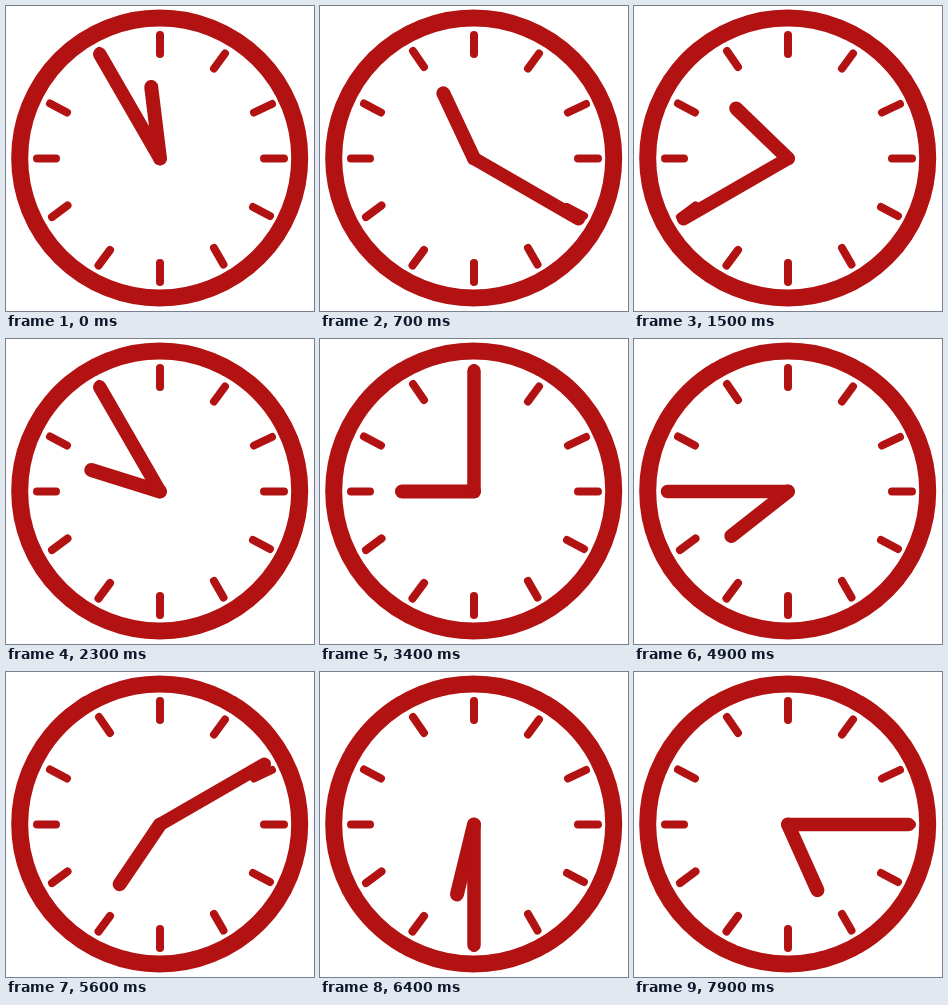
Write an HTML page that moves like this. It is 308 by 305 pixels and loops after 8000 ms.

```html
<!DOCTYPE html>
<html lang="en">
<head>
<meta charset="utf-8">
<title>Clock running backwards</title>
<style>
  html, body { margin: 0; width: 100%; height: 100%; overflow: hidden; background: #fff; }
  svg { display: block; width: 100vw; height: 100vh; }
  svg * { fill: none; stroke: #b21212; stroke-linecap: round; }
</style>
</head>
<body>
<svg viewBox="0 0 308 305">
  <circle cx="153.7" cy="152" r="140" stroke-width="17"/>
  <path stroke-width="8" d="M154 29V48M219 47.500L208 62.500M266 98L248 106.500M258 152.500H278M247 201L264 210M208 242L217.500 258.500M154 257V276M104 244L92.500 259.500M61.500 199.500L46 211M31 152.500H50M44 97.500L61 106.500M93 45L104 61"/>
  <path id="hour" stroke-width="14" d="M154 152.500V80.500"/>
  <path id="minute" stroke-width="13.5" d="M154 152.500V32"/>
</svg>
<script>
const LOOP = 8000, STEP = 100;
// Hour hand: [step, degrees clockwise from twelve]
const HOUR_KEYS = [[0, 353], [15, 314], [23, 287.4], [34, 270], [49, 231.9], [64, 193.7], [79, 155.9]];
const hour = document.getElementById('hour');
const minute = document.getElementById('minute');

function hourAngle(step) {
  const i = Math.max(1, HOUR_KEYS.findIndex(([s]) => s >= step));
  const [s0, a0] = HOUR_KEYS[i - 1], [s1, a1] = HOUR_KEYS[i];
  return a0 + (a1 - a0) * (step - s0) / (s1 - s0);
}

// The minute hand jumps back five minutes per step and skips one mark after step 19.
function minuteAngle(step) {
  return 330 - 30 * (step + (step > 19 ? 1 : 0));
}

function turn(hand, angle) {
  hand.setAttribute('transform', `rotate(${angle} 154 152.5)`);
}

function draw() {
  const step = Math.floor(performance.now() % LOOP / STEP);
  turn(hour, hourAngle(step));
  turn(minute, minuteAngle(step));
  requestAnimationFrame(draw);
}
draw();
</script>
</body>
</html>
```
